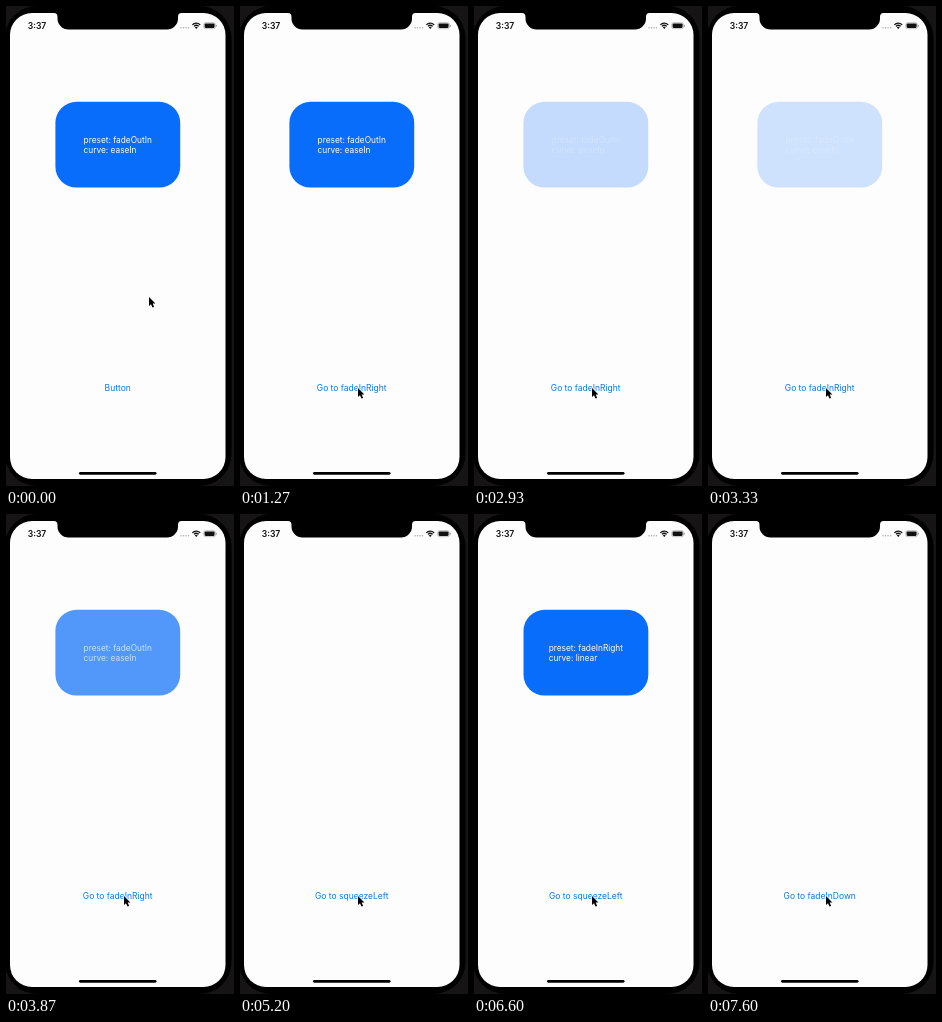
Animation, 228 px wide and 480 px high, one loop 8 s. Source, as an HTML page with a canvas:

```html
<!DOCTYPE html>
<html lang="en">
<head>
<meta charset="utf-8">
<title>Animation presets</title>
<style>
  html, body { margin: 0; width: 100%; height: 100%; overflow: hidden; background: #161414; }
  canvas { display: block; width: 228px; height: 480px; }
</style>
</head>
<body>
<canvas id="stage"></canvas>
<script>
const W = 228, H = 480, LOOP = 8000;
const FONT = 'Inter, "Liberation Sans", sans-serif';
const CENTER = 111.7;

const canvas = document.getElementById('stage');
const ctx = canvas.getContext('2d');
const ratio = window.devicePixelRatio || 1;
canvas.width = W * ratio;
canvas.height = H * ratio;
ctx.scale(ratio, ratio);

const clamp = v => Math.min(1, Math.max(0, v));
const progress = (t, from, to) => clamp((t - from) / (to - from));
const smooth = p => p * p * (3 - 2 * p);

// cubic-bezier(.42, 0, 1, 1), solved by bisection
function easeIn(x) {
  let lo = 0, hi = 1;
  for (let i = 0; i < 24; i++) {
    const u = (lo + hi) / 2;
    const bx = 1.26 * u * (1 - u) ** 2 + 3 * u * u * (1 - u) + u ** 3;
    if (bx < x) lo = u; else hi = u;
  }
  return smooth((lo + hi) / 2);
}

// Underdamped spring: 1 at rest position offset, settling to 0
function spring(seconds) {
  if (seconds <= 0) return 1;
  const freq = 9.24, decay = 7.1;
  return Math.exp(-decay * seconds) *
    (Math.cos(freq * seconds) + decay / freq * Math.sin(freq * seconds));
}

function fillRound(x, y, w, h, r, color) {
  ctx.fillStyle = color;
  ctx.beginPath();
  ctx.roundRect(x, y, w, h, r);
  ctx.fill();
}

function text(str, x, y, size, color, align = 'left', weight = 400) {
  ctx.font = `${weight} ${size}px ${FONT}`;
  ctx.textAlign = align;
  ctx.fillStyle = color;
  ctx.fillText(str, x, y);
}

function drawScreen() {
  ctx.fillStyle = '#161414';
  ctx.fillRect(0, 0, W, H);
  fillRound(-1, 0, 226.5, 480, 32, '#000');
  fillRound(4, 7, 215.5, 466, 22, '#fdfdfd');
}

function drawNotch() {
  ctx.fillStyle = '#000';
  ctx.beginPath();
  ctx.moveTo(48, 6);
  ctx.lineTo(48, 7);
  ctx.quadraticCurveTo(51.5, 7, 51.5, 11);
  ctx.arcTo(51.5, 23.5, 64, 23.5, 11);
  ctx.lineTo(160, 23.5);
  ctx.arcTo(172, 23.5, 172, 11, 11);
  ctx.lineTo(172, 11);
  ctx.quadraticCurveTo(172, 7, 175.5, 7);
  ctx.lineTo(175.5, 6);
  ctx.fill();
}

function drawStatus() {
  text('3:37', 31, 23, 8.6, '#111', 'center', 600);
  for (let i = 0; i < 4; i++) fillRound(174.3 + i * 2.5, 21, 1.5, 1.5, 0.75, '#aaa');

  ctx.strokeStyle = '#111';
  ctx.lineWidth = 1.3;
  for (const r of [3.2, 5.4]) {
    ctx.beginPath();
    ctx.arc(190.3, 22.6, r, -Math.PI * 0.76, -Math.PI * 0.24);
    ctx.stroke();
  }
  ctx.fillStyle = '#111';
  ctx.beginPath();
  ctx.moveTo(190.3, 22.9);
  ctx.arc(190.3, 22.9, 2, -Math.PI * 0.76, -Math.PI * 0.24);
  ctx.fill();

  ctx.strokeStyle = '#999';
  ctx.lineWidth = 0.6;
  ctx.beginPath();
  ctx.roundRect(197.8, 16.7, 11.6, 6, 1.8);
  ctx.stroke();
  fillRound(198.6, 17.5, 10, 4.4, 1.1, '#111');
  fillRound(210, 18.7, 0.9, 2, 0.4, '#999');

  fillRound(73, 466, 77.5, 2.7, 1.35, '#000');
}

function drawCard(shift, alpha, preset, curve) {
  if (alpha <= 0) return;
  ctx.save();
  ctx.beginPath();
  ctx.rect(4, 7, 215.5, 466);
  ctx.clip();
  ctx.globalAlpha = alpha;
  ctx.translate(shift, 0);
  fillRound(49.4, 95.8, 124.8, 85.8, 21, '#096dfb');
  const title = 'preset: ' + preset;
  ctx.font = `400 8.3px ${FONT}`;
  const x = CENTER - ctx.measureText(title).width / 2;
  text(title, x, 136.7, 8.3, '#fff');
  text('curve: ' + curve, x, 147.1, 8.3, '#fff');
  ctx.restore();
}

function cardAt(t) {
  if (t < 4730) {
    const fade = t < 3165 ? progress(t, 1600, 3165) : 1 - progress(t, 3165, 4545);
    drawCard(0, 1 - easeIn(fade), 'fadeOutIn', 'easeIn');
  } else if (t < 7600) {
    const rest = spring((t - 5620) / 1000);
    drawCard(-173 * rest, clamp(1 - rest), 'fadeInRight', 'linear');
  }
}

const LABELS = [
  [0, 'Button'],
  [1000, 'Go to fadeInRight'],
  [4730, 'Go to squeezeLeft'],
  [7600, 'Go to fadeInDown'],
];

function drawLabel(t) {
  const label = LABELS.findLast(([start]) => t >= start)[1];
  const pressed = LABELS.some(([start]) => t >= start - 70 && t < start);
  ctx.globalAlpha = pressed ? 0.4 : 1;
  text(label, CENTER, 385.2, 8.5, '#0878e8', 'center');
  ctx.globalAlpha = 1;
}

function drawCursor(t) {
  const p = smooth(progress(t, 20, 470));
  ctx.save();
  ctx.translate(143 - 25 * p, 291 + 91 * p);
  ctx.beginPath();
  for (const [x, y] of [[0, 0], [0, 9], [2, 7.2], [3.5, 10.6], [5.1, 9.9], [3.7, 6.6], [6.4, 6.5]]) {
    ctx.lineTo(x, y);
  }
  ctx.closePath();
  ctx.lineJoin = 'round';
  ctx.lineWidth = 1.4;
  ctx.strokeStyle = '#fff';
  ctx.stroke();
  ctx.fillStyle = '#000';
  ctx.fill();
  ctx.restore();
}

const begin = performance.now();

function render() {
  const t = (performance.now() - begin) % LOOP;
  drawScreen();
  drawNotch();
  drawStatus();
  cardAt(t);
  drawLabel(t);
  drawCursor(t);
  requestAnimationFrame(render);
}
render();
</script>
</body>
</html>
```
